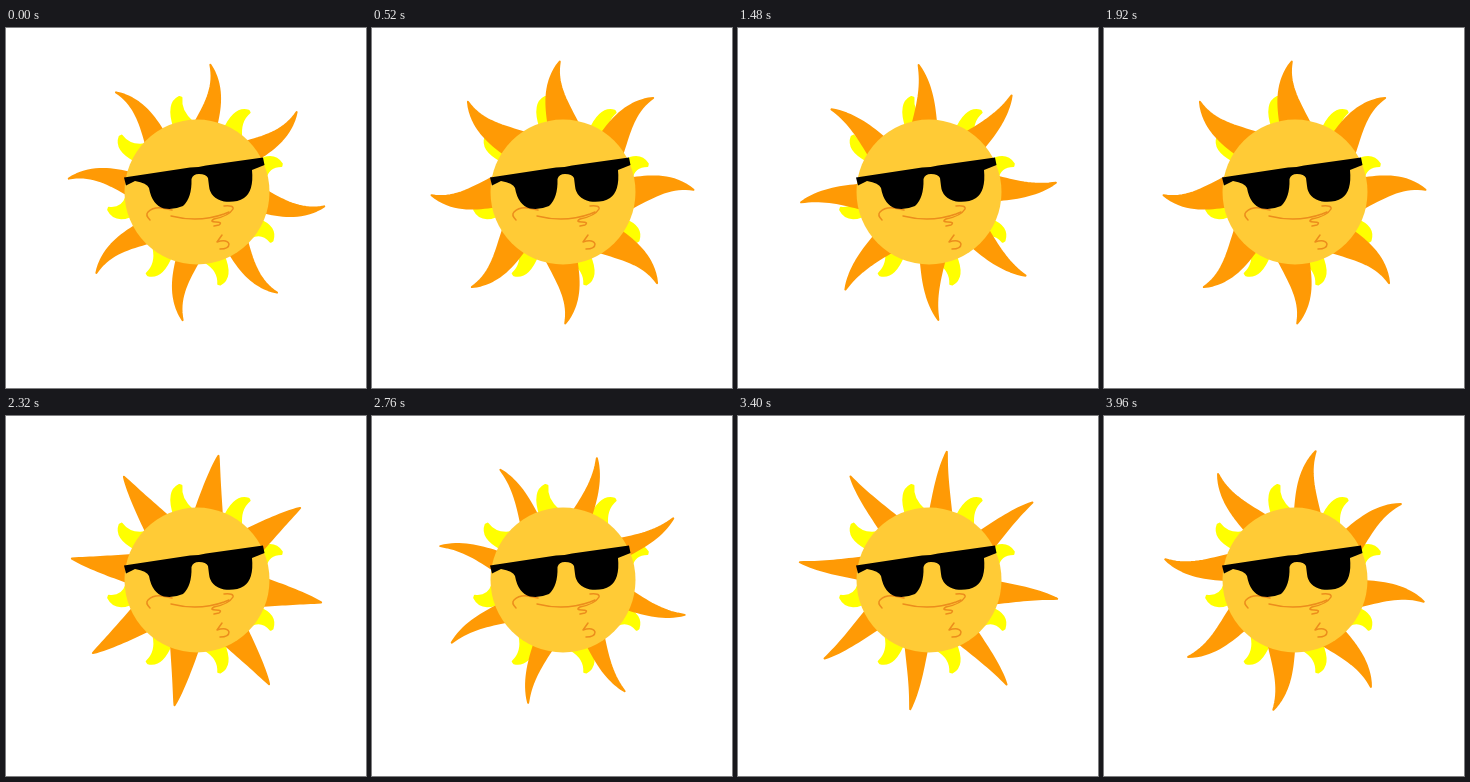
An HTML page that plays this animation: 360x360 px, repeating every 4000 ms.

```html
<!DOCTYPE html>
<html lang="en">
<head>
<meta charset="utf-8">
<title>Cool sun</title>
<style>
  html, body { margin: 0; width: 100%; height: 100%; overflow: hidden; background: #fff; }
  svg { display: block; width: 100vw; height: 100vh; }
</style>
</head>
<body>
<svg viewBox="0 0 360 360">
  <g transform="translate(190.5 164.5)">
    <g id="small" fill="#ff0" stroke="#ff0" stroke-width="2" stroke-linejoin="round"></g>
    <path id="rays" fill="#ff9a05" stroke="#ff9a05" stroke-width="2" stroke-linejoin="round"/>
  </g>
  <circle cx="191" cy="164" r="72.5" fill="#ffcb36"/>
  <g fill="none" stroke="#ec8d1c" stroke-width="1.5" stroke-linecap="round" stroke-linejoin="round">
    <path d="M144 192Q139 187 142 184Q147 179 156 180L166 182"/>
    <path d="M165 188Q193 195 218 186L223 184"/>
    <path d="M218 178Q228 177 227 181Q223 188 208 191Q203 194 210 194Q217 194 213 197L208 198"/>
    <path d="M216 207L211 214Q221 211 223 216Q223 221 214 221"/>
  </g>
  <path d="M118 149.500L184 139.500Q193 139.500 200 137.500L257 129.500L258.500 137L246 142
    Q248 163 238 170Q230 175 218 173.500Q204 170 203 158L202 150Q200 146 193 146
    Q187 146 185.500 151Q186 170 177 178Q168 182 158 180.500Q146 177 143 160
    Q141 155 129 153L120 157.500Z"/>
</svg>
<script>
const LOOP = 4000, STEP = 40, WAVE = 700;
const FACE_R = 71;

// time, angle of the ray bases in degrees
const spin = [
  [0, 8], [520, -45], [1040, -96.5], [1920, -180],
  [2760, -253.4], [3400, -305], [3960, -349.5], [4000, -352]
];

// time within a wave, base width, sway at the middle, sway at the tip, length
const wave = [
  [0, 23, 2.4, -1.8, 129.5],
  [340, 31, -2, 0.9, 126.5],
  [460, 27, -3.5, -1.2, 132],
  [520, 31, -4.2, -1.2, 132],
  [600, 23, -1.9, -1.9, 131],
  [660, 20, 1.6, -0.9, 128],
  [700, 23, 2.4, -1.8, 129.5]
];

// tip angle and length
const smallRays = [
  [-9.6, 98], [33, 98], [72, 91], [123, 91],
  [166, 96], [211, 97], [259.5, 91], [306.6, 96]
];

function sample(table, time) {
  const i = Math.max(1, table.findIndex(row => row[0] >= time));
  const a = table[i - 1], b = table[i];
  const k = (time - a[0]) / (b[0] - a[0]);
  return a.slice(1).map((v, j) => v + (b[j + 1] - v) * k);
}

function polar(r, degrees, side = 0) {
  const a = degrees * Math.PI / 180;
  const x = r * Math.sin(a) + side * Math.cos(a);
  const y = -r * Math.cos(a) + side * Math.sin(a);
  return x.toFixed(2) + ' ' + y.toFixed(2);
}

function rayPath(angle, [width, mid, tip, length]) {
  const m = 0.42;
  const b = (mid / m - tip) / (m - 1), a = tip - b;
  const left = [], right = [];
  for (let i = -1; i <= 16; i++) {
    const u = i / 16;
    const r = FACE_R + (length - 1 - FACE_R) * u;
    const phi = angle + a * u + b * u * u;
    const half = (width / 2 - 1) * Math.pow(1 - u, 0.88);
    left.push(polar(r, phi, -half));
    right.unshift(polar(r, phi, half));
  }
  return 'M' + left.concat(right).join('L') + 'Z';
}

document.getElementById('small').innerHTML = smallRays.map(([angle, r]) =>
  `<path transform="rotate(${angle})" d="M-11 -67Q-15 ${5 - r} -1 ${1 - r}L1 ${2 - r}Q-3 ${15 - r} 8 -70Z"/>`
).join('');

const rays = document.getElementById('rays');

function draw(now) {
  const t = Math.floor((now % LOOP) / STEP) * STEP;
  const [angle] = sample(spin, t);
  const shape = sample(wave, t % WAVE);
  let d = '';
  for (let i = 0; i < 8; i++) d += rayPath(angle + i * 45, shape);
  rays.setAttribute('d', d);
}

let start;
function tick(now) {
  start ??= now;
  draw(now - start);
  requestAnimationFrame(tick);
}
draw(0);
requestAnimationFrame(tick);
</script>
</body>
</html>
```
